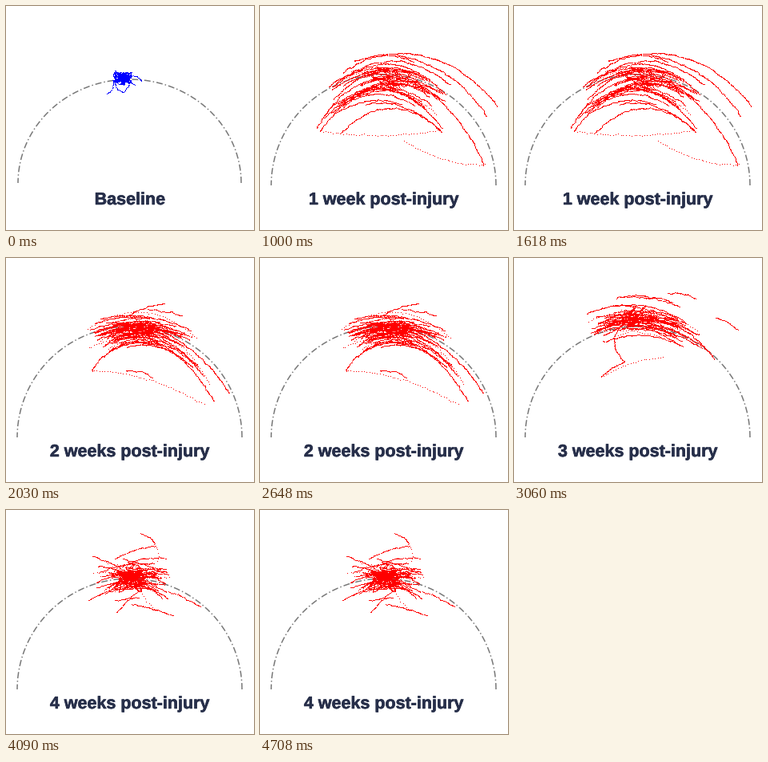
Animation of 310x281 px, one loop 5120 ms. Source, as a matplotlib script:

```python
import numpy as np
import matplotlib.pyplot as plt
import matplotlib.patheffects as pe
from matplotlib.animation import FuncAnimation

W, H, DPI = 310, 281, 100
PX = 72 / DPI
STEP, LOOP = 20, 5120
FIRST, HOLD = 1000, 1030
RED, BLUE, GRAY, INK = "#ff0000", "#0000ff", "#777777", "#272f4a"
FINE, DOTS = 0.65, 3.2


def trace(curve, gap, rng, wobble=0.55):
    """Even samples along a curve with a hand-like tremor."""
    s = np.r_[0, np.cumsum(np.hypot(*np.diff(curve, axis=0).T))]
    u = np.linspace(0, s[-1], max(int(s[-1] / gap), 2))
    knots = np.arange(0, s[-1] + 5, 4)
    return np.column_stack([
        np.interp(u, s, curve[:, k])
        + np.interp(u, knots, rng.normal(0, wobble, len(knots)))
        + rng.uniform(-0.35, 0.35, len(u)) for k in (0, 1)])


def sweep(rng, x0, y0, x1, y1, bow, gap=FINE):
    """Stroke between two ends, bowed to the left of its heading."""
    t = np.linspace(0, 1, 60)
    d = np.array([x1 - x0, y1 - y0])
    side = np.array([d[1], -d[0]]) / np.hypot(*d)
    curve = np.array([x0, y0]) + np.outer(t, d) + np.outer(4 * bow * t * (1 - t), side)
    return trace(curve, gap, rng)


def fan(rng, n, center, spread, left, right, radius, tilt=0.08, loose=0.2):
    """Nested arcs scattered around one crest."""
    out = []
    for _ in range(n):
        crest = rng.normal(center, spread)
        x = np.linspace(-rng.uniform(*left), rng.uniform(*right), 60)
        y = x**2 / (2 * radius * rng.uniform(0.8, 1.3)) + rng.normal(0, tilt) * x
        gap = DOTS if rng.random() < loose else FINE
        out.append(trace(crest + np.column_stack([x, y]), gap, rng))
    return out


def scribble(rng, n, center, spread):
    """Jagged hops packed around a center."""
    hops = center + np.clip(rng.normal(size=(n, 2)), -1.8, 1.8) * spread
    return trace(hops, FINE, rng, 0.8)


def baseline(rng):
    return [scribble(rng, 110, (147, 91.5), (7.2, 4.6)),
            sweep(rng, 134, 96, 127, 110, 2),
            sweep(rng, 136, 97, 147, 109, -3),
            sweep(rng, 147, 109, 153, 100, -1),
            sweep(rng, 157, 88, 169, 95, 2)]


def week1(rng):
    return [*fan(rng, 28, (161, 92), (7, 12), (20, 72), (25, 76), 75),
            scribble(rng, 22, (160, 94), (16, 9)),
            sweep(rng, 117, 70, 297, 127, 33),
            sweep(rng, 170, 62, 283, 139, 15),
            sweep(rng, 71, 153, 228, 110, 40),
            sweep(rng, 75, 158, 228, 155, 52),
            sweep(rng, 100, 161, 225, 157, 30),
            sweep(rng, 185, 88, 280, 200, 11),
            sweep(rng, 180, 170, 280, 200, -8, DOTS),
            sweep(rng, 75, 158, 225, 156, -6, DOTS)]


def week2(rng):
    return [*fan(rng, 40, (163, 88), (9, 9), (15, 55), (18, 62), 110),
            *fan(rng, 7, (168, 98), (5, 9), (10, 45), (65, 95), 62),
            scribble(rng, 18, (163, 90), (18, 6)),
            sweep(rng, 150, 75, 198, 58, 3),
            sweep(rng, 178, 66, 221, 73, 1),
            sweep(rng, 185, 88, 279, 171, 10),
            sweep(rng, 107, 142, 165, 104, 8),
            sweep(rng, 150, 143, 183, 151, 4),
            sweep(rng, 107, 142, 247, 185, 10, DOTS)]


def week3(rng):
    return [*fan(rng, 38, (151, 77), (8, 10), (15, 62), (18, 78), 105),
            scribble(rng, 26, (150, 73), (12, 7)),
            sweep(rng, 132, 50, 206, 62, 5),
            sweep(rng, 193, 45, 226, 51, 2),
            sweep(rng, 252, 76, 279, 92, 3),
            sweep(rng, 180, 78, 250, 128, 8),
            sweep(rng, 110, 150, 138, 131, 2),
            sweep(rng, 138, 131, 140, 80, 14),
            sweep(rng, 112, 149, 186, 126, 5, DOTS)]


def week4(rng):
    return [*fan(rng, 50, (156, 84), (9, 9), (5, 40), (5, 46), 120, 0.28),
            scribble(rng, 55, (155, 87), (11, 9)),
            sweep(rng, 136, 62, 187, 46, 3),
            sweep(rng, 169, 31, 186, 43, 2),
            sweep(rng, 138, 130, 165, 103, 1),
            sweep(rng, 158, 119, 208, 133, 1),
            sweep(rng, 203, 103, 243, 122, 1),
            sweep(rng, 185, 44, 190, 66, 2, DOTS)]


fig = plt.figure(figsize=(W / DPI, H / DPI), dpi=DPI, facecolor="white")
ax = fig.add_axes([0, 0, 1, 1])
ax.set(xlim=(0, W), ylim=(H, 0))
ax.axis("off")


def scene(title, color, make, cy=225, rx=140.5, ry=139):
    a = np.linspace(0, np.pi, 200)
    arc, = ax.plot(154.5 + rx * np.cos(a), cy - ry * np.sin(a), color=GRAY,
                   lw=1.5 * PX, ls=(0, (5.3, 2, 1, 2)))
    xy = np.vstack(make(np.random.default_rng(7)))
    dots, = ax.plot(xy[:, 0], xy[:, 1], ",", color=color, antialiased=False)
    label = ax.text(155, 249, title, ha="center", va="baseline", color=INK,
                    family="Liberation Sans", weight="bold", size=21.5 * PX)
    label.set_path_effects([pe.withStroke(linewidth=0.6 * PX, foreground=INK)])
    return arc, dots, label


scenes = [scene("Baseline", BLUE, baseline, 222, 139.5, 130)]
for n, make in enumerate((week1, week2, week3, week4), 1):
    scenes.append(scene(f"{n} week{'s' * (n > 1)} post-injury", RED, make))


def show(i):
    t = i * STEP + STEP / 2
    now = 0 if t < FIRST else 1 + int((t - FIRST) // HOLD)
    for k, parts in enumerate(scenes):
        for part in parts:
            part.set_visible(k == now)
    return [p for parts in scenes for p in parts]


anim = FuncAnimation(fig, show, frames=LOOP // STEP, interval=STEP,
                     init_func=lambda: show(0), repeat=True, repeat_delay=0, blit=False)
plt.show()
```
